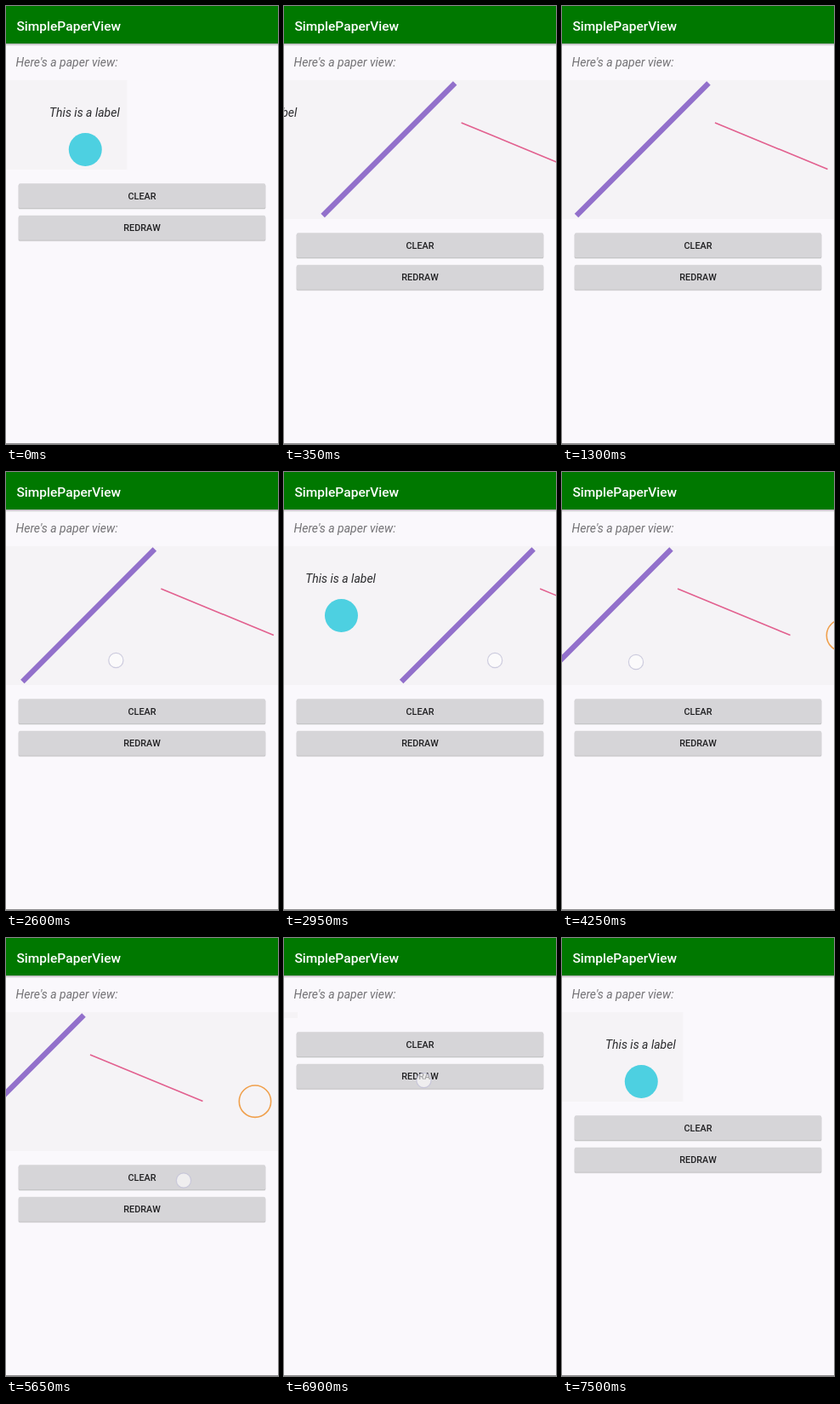
These frames come from a looping animation (320 by 514 pixels, 8 s). An HTML page:

```html
<!DOCTYPE html>
<html lang="en">
<head>
<meta charset="utf-8">
<title>Paper view</title>
<style>
  html, body { margin: 0; width: 100%; height: 100%; overflow: hidden; background: #faf8fc; }
  svg { display: block; width: 100%; height: 100%; font-family: Roboto, sans-serif; }
  .cap { font-size: 10.9px; font-weight: 500; fill: #202022; text-anchor: middle; }
  .note { font-size: 14px; font-style: italic; }
</style>
</head>
<body>
<svg viewBox="0 0 320 514">
  <defs>
    <linearGradient id="shade" x2="0" y2="1">
      <stop stop-color="#000" stop-opacity=".3"/>
      <stop offset="1" stop-color="#000" stop-opacity="0"/>
    </linearGradient>
    <g id="plate">
      <rect x="14.4" y=".9" width="291.2" height="29.6" rx="2" fill="#000" opacity=".09"/>
      <rect x="14.8" y=".6" width="290.4" height="29.2" rx="1.6" fill="#000" opacity=".16"/>
      <rect x="15" width="290" height="29" rx="1.5" fill="#d6d5d8"/>
    </g>
  </defs>
  <rect width="320" height="514" fill="#faf8fc"/>
  <rect y="513" width="320" height="1" fill="#8e8d90"/>
  <rect y="44" width="320" height="3" fill="url(#shade)"/>
  <rect width="320" height="44" fill="#007800"/>
  <text x="12.4" y="28.5" font-size="15.56" font-weight="500" fill="#fff">SimplePaperView</text>
  <text class="note" x="11.5" y="71" fill="#727174">Here's a paper view:</text>

  <g id="world">
    <rect id="paper" y="87" fill="#f5f3f6"/>
    <text id="label" class="note" x="51" y="129.5" fill="#2b2b2e">This is a label</text>
    <circle id="disc" cx="93.3" cy="168.5" r="19.5" fill="#4dd0e1"/>
    <path id="thick" d="M164 246 319.5 90.5" stroke="#9270cb" stroke-width="6.3"/>
    <path id="thin" d="M327 137 459.5 191.5" stroke="#e2608f" stroke-width="1.6"/>
    <circle id="ring" cx="521" cy="191.7" r="18.7" fill="none" stroke="#f0a04c" stroke-width="1.6"/>
  </g>

  <g id="buttons">
    <use href="#plate"/>
    <text class="cap" x="160" y="18.6">CLEAR</text>
    <use href="#plate" y="37.5"/>
    <text class="cap" x="160" y="56.1">REDRAW</text>
  </g>

  <circle id="touch" r="8.6" fill="#fff" fill-opacity=".6" stroke="#c3c2d8" stroke-opacity=".8" stroke-width="1.2"/>
</svg>
<script>
const LOOP = 8000;
const el = id => document.getElementById(id);
const show = (id, on) => el(id).setAttribute('visibility', on ? 'visible' : 'hidden');
const clamp = v => Math.max(0, Math.min(1, v));
const smooth = u => u * u * (3 - 2 * u);

// Piecewise linear track through [time, value] pairs
function track(t, keys) {
  for (let i = 1; i < keys.length; i++) {
    const [t0, a] = keys[i - 1], [t1, b] = keys[i];
    if (t < t1) return a + (b - a) * clamp((t - t0) / (t1 - t0));
  }
  return keys[keys.length - 1][1];
}

const dragRight = [[2550, 127], [2600, 129], [2750, 186], [2950, 248], [3100, 274], [3300, 284]];
const dragLeft = [[3700, 280], [3750, 273], [3850, 243], [4000, 180], [4150, 118], [4300, 72], [4400, 55], [4500, 50]];

function scrollAt(t) {
  if (t >= 5800) return 0;
  if (t >= 3700) return Math.max(0, Math.min(228, 278 - track(t, dragLeft)));
  if (t >= 2550) return Math.max(0, Math.min(147, 274 - track(t, dragRight)));
  return 147 * smooth(clamp((t - 100) / 350));
}

// Content stage: 0 empty, 1 label, 2 disc, 3 all
function stageAt(t) {
  if (t < 50 || t >= 7500) return 2;
  if (t < 5800) return 3;
  return t < 7100 ? 0 : 1;
}

// Touch windows: start, release, end of fade, position
const touches = [
  [2550, 3250, 3350, t => [track(t, dragRight), 221]],
  [3700, 4250, 4400, t => [track(t, dragLeft), 223]],
  [5650, 5800, 5900, () => [209, 284.5]],
  [6900, 7050, 7150, () => [164.5, 167]]
];

function render(t) {
  const stage = stageAt(t);
  const bottom = [94, 136, 192, 250][stage];
  const width = [16, 142.5, 142.5, 548][stage];
  el('paper').setAttribute('width', width);
  el('paper').setAttribute('height', bottom - 87);
  show('label', stage > 0);
  show('disc', stage > 1);
  show('thick', stage > 2);
  show('thin', stage > 2);
  show('ring', stage > 2);
  el('world').setAttribute('transform', `translate(${-scrollAt(t)} 0)`);
  el('buttons').setAttribute('transform', `translate(0 ${bottom + 16.3})`);

  const hit = touches.find(([from, , to]) => t >= from && t < to);
  show('touch', hit);
  if (hit) {
    const [, release, end, at] = hit, [x, y] = at(t);
    el('touch').setAttribute('cx', x);
    el('touch').setAttribute('cy', y);
    el('touch').setAttribute('opacity', 1 - clamp((t - release) / (end - release)));
  }
}

const start = performance.now();
function frame() {
  render((performance.now() - start) % LOOP);
  requestAnimationFrame(frame);
}
render(0);
requestAnimationFrame(frame);
</script>
</body>
</html>
```
